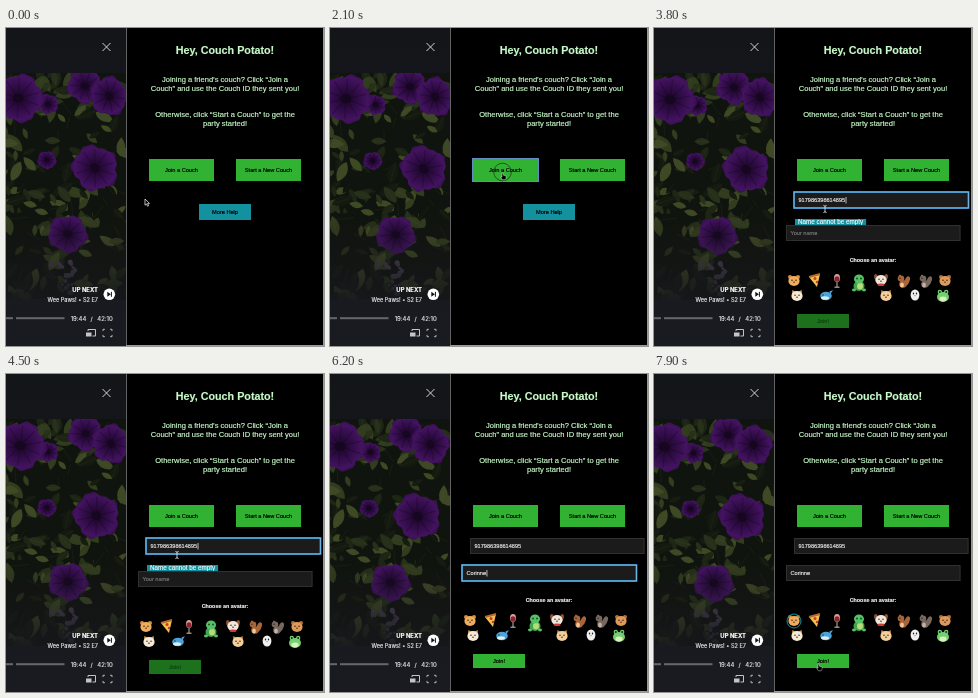
An HTML page with a canvas for the animation above (8000 ms loop, 318x318 px).

```html
<!DOCTYPE html>
<html lang="en">
<head>
<meta charset="utf-8">
<title>Join a Couch</title>
<style>
  html, body { margin: 0; width: 100%; height: 100%; overflow: hidden; background: #000; }
  canvas { display: block; width: 100vw; height: 100vh; }
</style>
</head>
<body>
<canvas id="stage"></canvas>
<script>
const SIZE = 318, LOOP = 8000, TAU = Math.PI * 2;
const SANS = '"Liberation Sans", Arial, sans-serif';
const UI = 'Inter, Arial, sans-serif';
const GREEN = '#32b232', TEAL = '#14919e', MINT = '#c6fbc8';
const FORM_AT = 2300, ID_AT = 3800, NAME_AT = 5400, PICK_AT = 6900;
const COUCH_ID = '917986398614895', NAME = 'Corinne';

const canvas = document.getElementById('stage');
const c = canvas.getContext('2d');

function resize() {
  const dpr = window.devicePixelRatio || 1;
  canvas.width = Math.round(innerWidth * dpr);
  canvas.height = Math.round(innerHeight * dpr);
}
addEventListener('resize', resize);
resize();

// ---------- helpers ----------
function box(x, y, w, h, fill) {
  c.fillStyle = fill;
  c.fillRect(x, y, w, h);
}
function frame(x, y, w, h, color, width = 1) {
  c.strokeStyle = color;
  c.lineWidth = width;
  c.strokeRect(x, y, w, h);
}
function oval(x, y, rx, ry, fill, turn = 0) {
  c.fillStyle = fill;
  c.beginPath();
  c.ellipse(x, y, rx, ry, turn, 0, TAU);
  c.fill();
}
function ring(x, y, r, color, width = 1) {
  c.beginPath();
  c.arc(x, y, r, 0, TAU);
  c.strokeStyle = color;
  c.lineWidth = width;
  c.stroke();
}
function poly(points, fill) {
  c.beginPath();
  points.forEach(([x, y]) => c.lineTo(x, y));
  c.closePath();
  c.fillStyle = fill;
  c.fill();
}
function line(points, color, width = 1) {
  c.beginPath();
  points.forEach(([x, y], i) => i ? c.lineTo(x, y) : c.moveTo(x, y));
  c.strokeStyle = color;
  c.lineWidth = width;
  c.stroke();
}
// A hairline outline gives the slightly heavier text rendering.
function text(str, x, y, size, color, align = 'center', weight = 400, family = SANS) {
  c.font = `${weight} ${size}px ${family}`;
  c.textAlign = align;
  c.textBaseline = 'alphabetic';
  c.fillStyle = c.strokeStyle = color;
  c.lineWidth = 0.18;
  c.fillText(str, x, y);
  c.strokeText(str, x, y);
}
function seeded(seed) {
  return () => (seed = (seed * 16807) % 2147483647) / 2147483647;
}
function at(x, y, draw) {
  c.save();
  c.translate(x, y);
  draw();
  c.restore();
}
function ramp(y0, y1, ...colors) {
  const g = c.createLinearGradient(0, y0, 0, y1);
  colors.forEach((color, i) => g.addColorStop(i / (colors.length - 1), color));
  return g;
}

// ---------- video ----------
const rnd = seeded(4127);
const LEAF_TONES = ['#141a10', '#1c2414', '#262f19', '#313b1e', '#3d4824', '#10140e'];
const leaves = Array.from({ length: 230 }, () => ({
  x: rnd() * 140 - 10, y: 40 + rnd() * 240, r: 5 + rnd() * 7,
  turn: rnd() * TAU, tone: LEAF_TONES[Math.floor(rnd() * 6)]
}));
const sprigs = Array.from({ length: 26 }, () => ({
  x: 42 + rnd() * 28, y: 234 + rnd() * 32, r: 1 + rnd() * 1.6
}));
const flowers = [
  [42, 76, 11, 0.6], [40, 132, 10, 0.2], [78, 58, 19, 0.3], [103, 68, 21, 1.1],
  [13, 70, 27, 0.1], [90, 140, 25, 0.7], [62, 206, 21, 0.2]
];

function drawLeaf({ x, y, r, turn, tone }) {
  at(x, y, () => {
    c.rotate(turn);
    c.beginPath();
    c.moveTo(-r, 0);
    c.quadraticCurveTo(-r * 0.1, -r * 0.9, r, 0);
    c.quadraticCurveTo(-r * 0.1, r * 0.9, -r, 0);
    c.fillStyle = tone;
    c.fill();
    line([[-r * 0.8, 0], [r * 0.8, 0]], 'rgba(95,108,60,.2)', 0.5);
  });
}

function drawFlower(x, y, r, turn) {
  at(x, y, () => {
    c.rotate(turn);
    const tone = c.createRadialGradient(0, 0, 1, 0, 0, r);
    tone.addColorStop(0, '#1a0724');
    tone.addColorStop(0.4, '#2f0c45');
    tone.addColorStop(0.8, '#431360');
    tone.addColorStop(1, '#350f4c');
    c.beginPath();
    for (let a = 0; a <= TAU; a += 0.06) {
      const d = r * (0.92 + 0.07 * Math.cos(5 * a) + 0.03 * Math.sin(13 * a + r));
      c.lineTo(Math.cos(a) * d, Math.sin(a) * d * 0.94);
    }
    c.closePath();
    c.fillStyle = tone;
    c.fill();
    for (let a = 0.3; a < TAU; a += TAU / 10)
      line([[0, 0], [Math.cos(a) * r * 0.8, Math.sin(a) * r * 0.75]], 'rgba(24,6,36,.35)', 1.2);
    oval(0, 0, r * 0.2, r * 0.16, '#160620');
  });
}

function drawVideo(t) {
  const p = t / LOOP;
  const dx = 3 * Math.sin(p * 5), dy = 3 * p;
  c.save();
  c.beginPath();
  c.rect(0, 45, 120, 227);
  c.clip();
  box(0, 45, 120, 227, '#10140e');
  for (const l of leaves) drawLeaf({ ...l, x: l.x + dx * 0.7, y: l.y + dy * 0.7 });
  for (const s of sprigs) oval(s.x + dx, s.y + dy, s.r, s.r, '#4a3f55');
  flowers.forEach(([x, y, r, turn], i) =>
    drawFlower(x + dx + Math.sin(p * 9 + i), y + dy, r, turn + 0.05 * Math.sin(p * 8 + i)));
  box(0, 190, 120, 82, ramp(190, 272, 'rgba(22,23,28,0)', 'rgba(22,23,28,.35)', 'rgba(22,23,28,.85)'));
  c.restore();
}

function drawPlayer(t) {
  box(0, 0, 120, SIZE, ramp(0, SIZE, '#131519', '#1a1b21'));
  drawVideo(t);

  line([[96.5, 15], [104.5, 23]], '#d5d5d7');
  line([[104.5, 15], [96.5, 23]], '#d5d5d7');

  text('UP NEXT', 92, 263.7, 5.9, '#fff', 'right', 700, UI);
  text('Wee Paws! • S2 E7', 92, 273.8, 5.6, '#e4e4e6', 'right', 400, UI);
  oval(103.3, 266.3, 5.8, 5.8, '#fff');
  poly([[101.3, 263.8], [101.3, 268.8], [104.9, 266.3]], '#111');
  box(104.9, 263.8, 1, 5, '#111');

  box(0, 289.2, 7, 2, '#66676b');
  box(10, 289.2, 48.5, 2, '#66676b');
  text('19:44', 72.5, 292.7, 6, '#dedee0', 'center', 400, UI);
  text('/', 85.5, 292.7, 6, '#dedee0', 'center', 400, UI);
  text('42:10', 99, 292.7, 6, '#dedee0', 'center', 400, UI);

  line([[82, 303], [82, 301.5], [89.5, 301.5], [89.5, 308], [86.5, 308]], '#c5c5c8');
  box(80, 304.5, 5.5, 4, '#c5c5c8');
  for (const sx of [-1, 1]) for (const sy of [-1, 1])
    line([[101.5 + sx * 2.6, 305 + sy * 3.7], [101.5 + sx * 4.5, 305 + sy * 3.7],
          [101.5 + sx * 4.5, 305 + sy * 1.9]], '#c5c5c8', 0.9);
}

// ---------- avatars ----------
function face(color, ear, earColor = color) {
  for (const s of [-1, 1]) {
    if (ear === 'round') oval(s * 4, -4, 2, 2, earColor);
    if (ear === 'point') poly([[s * 5, -1], [s * 4.6, -6], [s, -4]], earColor);
    if (ear === 'flop') oval(s * 4.6, -2, 2, 4, earColor, s * 0.3);
  }
  oval(0, 0, 5.6, 5, color);
  for (const s of [-1, 1]) oval(s * 2, -0.7, 0.7, 0.8, '#241812');
  oval(0, 1.2, 0.9, 0.6, '#5a2a20');
}
function critter(body, belly) {
  oval(4, 0, 2.4, 5, body, 0.4);
  oval(0, 3, 3.8, 3.8, body);
  oval(-1, 4, 1.9, 2.5, belly);
  oval(-2, -2.5, 3.3, 3, body);
  oval(-3, -5, 1.2, 1.5, body);
  oval(-3, -2.8, 0.6, 0.7, '#21140e');
}
const avatars = [
  [140, 0, () => face('#efad5d', 'round', '#d98c3e')],
  [161, -1, () => {
    poly([[-6, -3], [5, -6], [2, 7]], '#f4c04f');
    line([[-6, -3], [5, -6]], '#b9692e', 2);
    oval(0, -1.5, 1.5, 1.5, '#c93b2b');
    oval(2, 2, 1.2, 1.2, '#c93b2b');
  }],
  [183, 0, () => {
    oval(0, -3, 3, 4, '#d4a69c');
    oval(0, -2, 2.5, 2.8, '#8f2430');
    line([[0, 1], [0, 6]], '#d9c9c4', 0.9);
    line([[-2.5, 6.2], [2.5, 6.2]], '#d9c9c4');
  }],
  [205, 0, () => {
    oval(0, 5, 5.5, 5, '#3fa64c');
    oval(1, 5, 3, 3.5, '#b5dc78');
    oval(0, -2, 5, 4.6, '#56c266');
    for (const s of [-1, 1]) {
      oval(s * 5, 9, 2, 1.4, '#56c266');
      oval(s * 2, -2.5, 0.8, 1, '#16331a');
    }
  }],
  [227, -1, () => { face('#f0e6da', 'flop', '#8b5233'); oval(0, 4.8, 3.6, 1.2, '#cc3d36'); }],
  [249, 0, () => critter('#a8653a', '#edc79a')],
  [271, 0, () => critter('#77675f', '#c3b1a5')],
  [291, 0, () => face('#dd9a5a', 'round', '#b86f38')],
  [143, 15, () => face('#f5ead5', 'point', '#e5a14d')],
  [172, 14, () => {
    oval(0, 1, 5.8, 4.2, '#4da3d8');
    oval(-1, 3, 4, 1.8, '#d9effa');
    poly([[4, 0], [7, -5], [3.5, -3.5]], '#4da3d8');
    oval(-3, 0, 0.7, 0.7, '#122a3a');
  }],
  [232, 15, () => face('#f3cf9b', 'point', '#e08b36')],
  [261, 14, () => {
    oval(0, 0, 4.4, 5.6, '#f0f0f0');
    for (const s of [-1, 1]) oval(s * 1.5, -1.5, 0.7, 0.9, '#222');
    oval(0, 0.6, 1.1, 0.7, '#e8a03c');
  }],
  [289, 15, () => {
    for (const s of [-1, 1]) oval(s * 3.2, -4, 2.2, 2.2, '#74cf72');
    oval(0, 1, 6, 5, '#74cf72');
    oval(0, 3, 3.6, 2.4, '#d8f2b8');
    for (const s of [-1, 1]) oval(s * 3.2, -4, 1, 1, '#183018');
  }]
];

// ---------- couch panel ----------
function button(label, x, y, w, h, fill = GREEN, ink = '#000') {
  box(x, y, w, h, fill);
  text(label, x + w / 2, y + h / 2 + 2, 5.65, ink);
}
function field(x, y, value, hint, focused) {
  box(x, y, 174.5, 16, '#1b1b1b');
  frame(x + 0.5, y + 0.5, 173.5, 15, '#303030');
  if (focused) {
    frame(x, y, 174.5, 16, '#318fd0', 1.8);
    frame(x, y, 174.5, 16, '#a9d9f5', 0.5);
  }
  text(value || hint, x + 4.5, y + 10.2, 5.6, value ? '#e6e6e6' : '#747474', 'left');
  if (focused && value) box(x + 5 + c.measureText(value).width, y + 5, 0.7, 6.5, '#fff');
}
function warning(str, y) {
  c.font = `400 6.3px ${SANS}`;
  box(141, y - 6, c.measureText(str).width + 6, 6.5, TEAL);
  text(str, 144, y - 1, 6.3, '#eafcfc', 'left');
}

function drawForm(t) {
  const noId = t < ID_AT, noName = t < NAME_AT;
  const idY = 164 + (noId ? 6 : 0);
  const nameY = idY + 27 + (noName ? 6 : 0);
  const typed = NAME.slice(0, Math.max(0, Math.floor((t - NAME_AT) / 100) + 1));

  if (noId) warning('Couch ID cannot be empty', idY);
  field(noId ? 132 : 140, idY, noId ? '' : COUCH_ID, 'Couch ID', t >= 3000 && t < 4800);
  if (noName) warning('Name cannot be empty', nameY);
  field(132, nameY, typed, 'Your name', t >= 4800 && t < PICK_AT);

  text('Choose an avatar:', 219, nameY + 37.3, 5.4, '#eee', 'center', 700);
  avatars.forEach(([x, dy, draw], i) => at(x, nameY + 56 + dy, () => {
    draw();
    if (i === 0 && t >= PICK_AT) ring(0, 0, 7, TEAL);
  }));
  if (noName) button('Join!', 143, nameY + 89, 52, 14, '#1d711d', '#0d430d');
  else button('Join!', 143, nameY + 89, 52, 14);
}

function drawPanel(t) {
  box(120, 0, 198, SIZE, '#000');
  box(120, 0, 1, SIZE, '#626262');
  box(317, 0, 1, SIZE, '#9a9a9a');
  box(120, 317, 198, 1, '#9a9a9a');

  text('Hey, Couch Potato!', 219, 26, 10.75, MINT, 'center', 700);
  text('Joining a friend’s couch? Click “Join a', 219, 53.6, 7.55, MINT);
  text('Couch” and use the Couch ID they sent you!', 219, 62.6, 7.55, MINT);
  text('Otherwise, click “Start a Couch” to get the', 219, 89.4, 7.55, MINT);
  text('party started!', 219, 98.4, 7.55, MINT);

  button('Join a Couch', 143, 131, 65, 22);
  button('Start a New Couch', 230, 131, 65, 22);
  if (t >= 2000 && t < 3000) {
    frame(142.5, 130.5, 66, 23, '#4478b8');
    c.setLineDash([1, 1]);
    frame(142.5, 130.5, 66, 23, '#a9c4dc', 0.6);
    c.setLineDash([]);
  }
  if (t < FORM_AT) button('More Help', 193, 176, 52, 16, TEAL);
  else drawForm(t);
}

// ---------- pointer ----------
const path = [
  [100, 139, 171], [800, 172, 145], [2700, 172, 145], [3000, 171, 181],
  [4600, 171, 181], [4900, 170, 206], [6400, 170, 206], [6800, 140, 248],
  [7200, 140, 248], [7700, 164, 290]
];
const ARROW = [[0, 0], [0, 6.2], [1.5, 4.9], [2.5, 7.2], [3.6, 6.7], [2.6, 4.5], [4.5, 4.4]];
const HAND = [[0, 0], [1.2, 0], [1.4, 2.2], [4.2, 3], [4, 5.4], [3.2, 6.8], [0.4, 6.8], [-1.4, 4], [0, 4]];

function pointerAt(t) {
  const i = path.findIndex(k => k[0] > t);
  if (i === 0) return path[0].slice(1);
  if (i < 0) return path[path.length - 1].slice(1);
  const [t0, x0, y0] = path[i - 1], [t1, x1, y1] = path[i];
  const p = (t - t0) / (t1 - t0), e = p * p * (3 - 2 * p);
  return [x0 + (x1 - x0) * e, y0 + (y1 - y0) * e];
}
function drawPointer(t) {
  if (t >= NAME_AT && t < 6400) return;
  const [x, y] = pointerAt(t);
  const onButton = (t >= 700 && t < 2800) || t >= 7600;
  at(x, y, () => {
    if (t >= 2000 && t < 2300) ring(0.5, -1, 8.8, '#17401a', 0.8);
    if (t >= 2900 && t < 6500) {
      line([[0, -3], [0, 3]], '#ddd', 0.9);
      for (const s of [-1, 1])
        line([[-1.6, s * 3.6], [0, s * 2.8], [1.6, s * 3.6]], '#ddd', 0.9);
      return;
    }
    poly(onButton ? HAND : ARROW, '#000');
    c.strokeStyle = '#fff';
    c.lineWidth = onButton ? 0.4 : 0.7;
    c.stroke();
  });
}

function render(now) {
  const step = Math.floor((now % LOOP) / 100) * 100;
  const t = step < 200 ? 0 : step;
  c.setTransform(canvas.width / SIZE, 0, 0, canvas.height / SIZE, 0, 0);
  drawPlayer(t);
  drawPanel(t);
  drawPointer(t);
}
const start = performance.now();
function tick() {
  render(performance.now() - start);
  requestAnimationFrame(tick);
}
tick();
</script>
</body>
</html>
```
